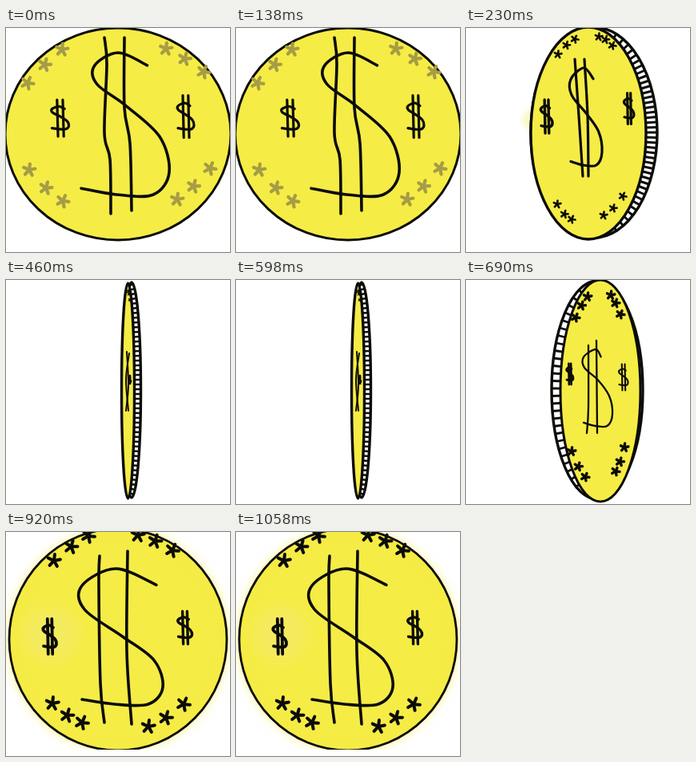
An HTML page with a canvas for the animation above (1.15 s loop, 280 by 281 pixels).

```html
<!DOCTYPE html>
<html lang="en">
<head>
<meta charset="utf-8">
<title>Spinning coin</title>
<style>
html, body { margin: 0; height: 100%; overflow: hidden; background: #fff; }
canvas { display: block; width: 100vw; height: 100vh; }
</style>
</head>
<body>
<canvas id="stage" width="280" height="281"></canvas>
<script>
const ctx = document.getElementById('stage').getContext('2d');
const YELLOW = '#f6ec46', INK = '#0c0c08', HOLD = 230;

// Smooth stroke through the given points.
function curve(width, ...points) {
  const at = i => points[Math.max(0, Math.min(points.length - 1, i))];
  const path = new Path2D();
  path.moveTo(...points[0]);
  for (let i = 0; i < points.length - 1; i++) {
    const [a, b, c, d] = [at(i - 1), at(i), at(i + 1), at(i + 2)];
    path.bezierCurveTo(
      b[0] + (c[0] - a[0]) / 6, b[1] + (c[1] - a[1]) / 6,
      c[0] - (d[0] - b[0]) / 6, c[1] - (d[1] - b[1]) / 6, ...c);
  }
  ctx.lineWidth = width;
  ctx.stroke(path);
}

function disc(cx, cy, rx, ry, width, fill = YELLOW) {
  const path = new Path2D();
  path.ellipse(cx, cy, rx, ry, 0, 0, 2 * Math.PI);
  ctx.fillStyle = fill;
  ctx.fill(path);
  ctx.lineWidth = width;
  ctx.stroke(path);
  return path;
}

// White rim with notches; side is 1 for right, -1 for left.
function rim(cx, cy, rx, ry, side, gap, notch) {
  ctx.save();
  ctx.clip(disc(cx, cy, rx, ry, 3.4, '#fff'));
  for (let y = cy - ry + 2; y < cy + ry; y += gap) {
    const v = (y - cy) / ry, u = side * Math.sqrt(1 - v * v);
    const angle = Math.atan2(v / ry, u / rx);
    const x = cx + rx * u, dx = 24 * Math.cos(angle), dy = 24 * Math.sin(angle);
    curve(notch, [x + dx, y + dy], [x - dx, y - dy]);
  }
  ctx.restore();
}

// Three stars on a slightly bent line from one point to another.
function stars(size, width, ...rows) {
  for (const [x0, y0, x1, y1] of rows) {
    for (let k = 0; k < 3; k++) {
      const bend = k === 1 ? (y0 < 140 ? -2 : 3) : 0;
      const x = x0 + (x1 - x0) * k / 2, y = y0 + (y1 - y0) * k / 2 + bend;
      for (let i = 0; i < 5; i++) {
        const a = i * Math.PI * 0.4 - 1.45 + k * 0.15;
        curve(width, [x, y], [x + size * Math.cos(a), y + size * Math.sin(a)]);
      }
    }
  }
}

// The S of a dollar sign inside a box; waist is the height of its crossing.
function ess(width, [x, y, w, h], waist = 0.45, hook = 0.75, inset = 0) {
  const up = (u, v) => [x + u * w, y + v * waist * h];
  const low = (u, v) => [x + u * w, y + (waist + v * (1 - waist)) * h];
  curve(width, up(hook, 0.24), up(0.42, 0), up(inset, 0.25), up(inset + 0.03, 0.6), up(0.5, 1),
    low(0.89, 0.35), low(1, 0.75), low(0.82, 1), low(0.4, 1), low(0, 0.93));
}

// Small dollar sign centred on x, y.
function dollar(x, y, w, h, width) {
  ess(width, [x - w / 2, y - h * 0.32, w, h * 0.62]);
  for (const s of [-0.18, 0.16]) {
    curve(width, [x + (s - 0.02) * w, y - h / 2], [x + (s + 0.04) * w, y + h / 2]);
  }
}

function glow(x, y, r, color) {
  const g = ctx.createRadialGradient(x, y, r * 0.5, x, y, r);
  g.addColorStop(0, color);
  g.addColorStop(1, 'rgba(246,236,100,0)');
  ctx.fillStyle = g;
  ctx.fillRect(x - r, y - r, 2 * r, 2 * r);
}

const poses = [
  function front() {
    disc(140, 133, 141, 133, 3);
    ctx.strokeStyle = '#a59d45';
    stars(7.5, 4.2, [70, 27, 27, 69], [200, 26, 247, 55], [29, 178, 71, 217], [214, 215, 255, 176]);
    ctx.strokeStyle = INK;
    curve(3.6, [123, 12], [126, 45], [123, 132], [130, 165], [131, 233]);
    curve(3.6, [148, 12], [148, 100], [155, 145], [157, 229]);
    ess(3.6, [94, 31, 110, 178], 0.37, 0.75, 0.15);
    dollar(68, 113, 21, 46, 3.2);
    dollar(225, 111, 20, 53, 3.2);
  },
  function turning() {
    glow(84, 115, 18, 'rgba(246,236,100,.35)');
    rim(160, 131, 79, 132, 1, 6.5, 3);
    disc(153, 132, 72, 133, 3.4);
    stars(4.6, 2.6, [115, 33, 136, 14], [166, 11, 183, 22], [114, 221, 132, 240], [172, 235, 196, 211]);
    curve(3.2, [136, 39], [141, 110], [146, 186]);
    curve(3.2, [148, 39], [152, 110], [153, 186]);
    ess(3.2, [131, 50, 39, 122], 0.47, 0.72);
    dollar(101, 111, 14, 42, 3.4);
    dollar(204, 101, 12, 39, 3.2);
  },
  function edge() {
    rim(157, 138, 11.5, 135, 1, 6, 2.4);
    disc(152.5, 139, 8, 135, 3.4);
    stars(2, 1.4, [153, 14, 155, 25]);
    curve(2, [151, 90], [153, 132], [150, 164]);
    curve(2, [154, 92], [150, 125], [153, 164]);
    dollar(155, 125, 3, 11, 1.6);
  },
  function turned() {
    rim(164, 138, 57, 137, -1, 9.5, 2.8);
    disc(168, 139, 50, 139, 3);
    stars(5, 3.4, [152, 21, 137, 47], [181, 19, 193, 43], [132, 215, 149, 247], [198, 210, 187, 240]);
    curve(2.3, [153, 82], [153, 160], [151, 192]);
    curve(2.3, [163, 76], [164, 192]);
    ess(2.3, [147, 87, 36, 96], 0.4, 0.6);
    dollar(130, 118, 8, 26, 2.8);
    dollar(197, 122, 11, 33, 2.1);
  },
  function back() {
    ctx.save();
    ctx.beginPath();
    ctx.rect(0, 0, 280, 273);
    ctx.clip();
    ctx.shadowColor = 'rgba(246,236,70,.5)';
    ctx.shadowBlur = 12;
    disc(140, 135, 136, 139, 2.8);
    ctx.restore();
    glow(56, 128, 45, 'rgba(244,234,104,.7)');
    stars(8, 4, [60, 36, 103, 5], [165, 4, 208, 23], [58, 215, 95, 239], [178, 244, 222, 216]);
    curve(3.6, [117, 30], [116, 65], [118, 190], [123, 239]);
    curve(3.6, [152, 24], [151, 150], [157, 241]);
    ess(3.6, [95, 46, 101, 170], 0.5, 0.92);
    dollar(55, 131, 16, 44, 3.8);
    dollar(224, 120, 17, 41, 3.4);
  }
];

ctx.lineCap = ctx.lineJoin = 'round';
ctx.strokeStyle = INK;

let shown = -1;
function tick(now) {
  const pose = Math.floor(now / HOLD) % poses.length;
  if (pose !== shown) {
    ctx.fillStyle = '#fff';
    ctx.fillRect(0, 0, 280, 281);
    poses[pose]();
    shown = pose;
  }
  requestAnimationFrame(tick);
}
tick(0);
</script>
</body>
</html>
```
